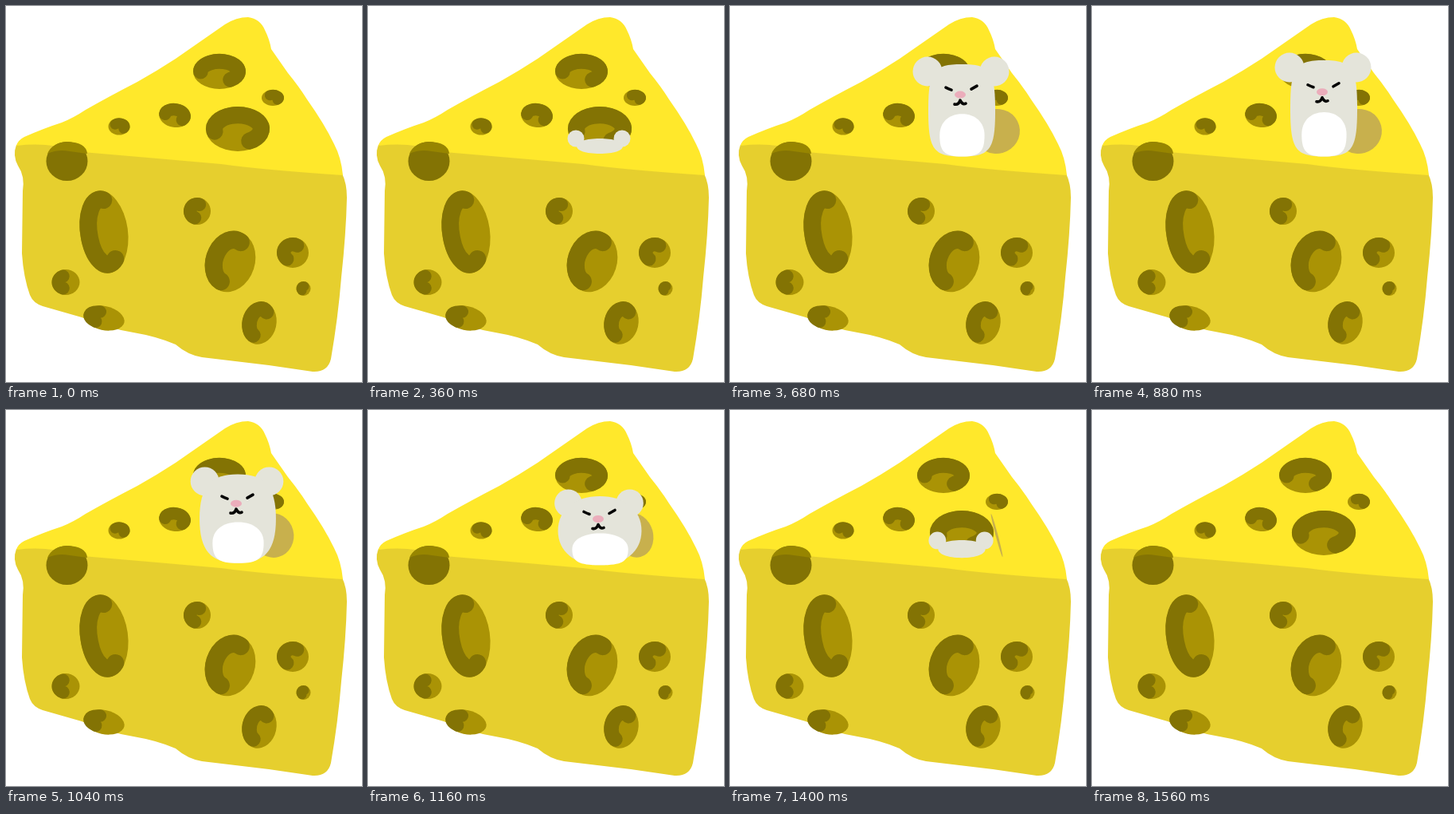
An HTML page for the animation above (2.04 s loop, 447 by 471 pixels).

```html
<!DOCTYPE html>
<html lang="en">
<head>
<meta charset="utf-8">
<title>Mouse in cheese</title>
<style>
  html, body { margin: 0; width: 100%; height: 100%; overflow: hidden; background: #fff; }
  svg { display: block; }
  .light { fill: #aa9305; }
  .dark { fill: none; stroke: #837304; stroke-linecap: round; }
  .line { fill: none; stroke: #050505; stroke-width: 3.6; stroke-linecap: round; stroke-linejoin: round; }
</style>
</head>
<body>
<svg width="447" height="471" viewBox="0 0 447 471">
  <path fill="#e6cf2e" d="M13 174Q8 187 15 200Q24 213 21 232L20 310Q22 340 30 362Q34 372 46 376L95 390Q125 403 160 409Q190 414 213 424Q228 437 246 440L330 450L385 458Q404 459 408 442Q417 390 421 340Q427 285 428 240Q428 222 422 210L300 190L40 165Z"/>
  <path fill="#ffe82b" d="M13 175Q15 168 23 164Q48 153 70 146Q85 140 100 130Q130 113 165 95Q190 81 213 66L275 23Q289 14 304 14Q319 16 325 30Q331 42 333 54L354 84Q368 101 378 117Q400 148 412 173Q421 190 423 212Q320 205 270 198L190 191L85 182Q55 170 13 175Z"/>
  <g id="holes"></g>
  <ellipse cx="76.500" cy="194.500" rx="26" ry="24.500" fill="#837304"/>
  <path fill="#978500" d="M52 185Q58 171 77 170Q101 171 102 185L80 182Q65 179 52 185Z"/>
  <g id="mouse">
    <ellipse id="shadow" fill="#c8b04d"/>
    <g fill="#e4e4da">
      <circle id="earL"/><circle id="earR"/><path id="body"/>
    </g>
    <g id="front">
      <path id="belly" fill="#fff"/>
      <g id="face">
        <path class="line" d="M-18-9q4 2 7 3M14-7l7-4M-7 12q5 1 7-5q3 6 7 4"/>
        <ellipse rx="7" ry="4.500" fill="#ebadbb"/>
      </g>
    </g>
  </g>
</svg>
<script>
const $ = id => document.getElementById(id);
const set = (id, attrs) => Object.entries(attrs).forEach(([k, v]) => $(id).setAttribute(k, v));
const clamp = v => Math.max(0, Math.min(1, v));

// A light oval with a dark brush stroke running inside its rim between two angles
function hole(cx, cy, rx, ry, from, to, tilt = 0) {
  const width = 4 * Math.sqrt(Math.min(rx, ry));
  const ax = rx - width / 2, ay = ry - width / 2;
  const point = deg => `${ax * Math.cos(deg * Math.PI / 180)} ${ay * Math.sin(deg * Math.PI / 180)}`;
  $('holes').insertAdjacentHTML('beforeend',
    `<g transform="translate(${cx} ${cy}) rotate(${tilt})">
       <ellipse class="light" rx="${rx}" ry="${ry}"/>
       <path class="dark" stroke-width="${width}" d="M${point(from)}A${ax} ${ay} 0 ${+(to - from > 180)} 1 ${point(to)}"/>
     </g>`);
}

hole(268, 82, 33, 22, 180, 415);
hole(335, 115, 14, 10, 240, 400);
hole(212, 137, 20, 15, 180, 395, 8);
hole(142, 151, 13.5, 10.5, 225, 395);
hole(291, 154, 40, 28, 170, 420);
hole(123, 283, 30, 52, 60, 285, -8);
hole(240, 257, 17, 17, 110, 290);
hole(281.5, 320, 31, 39, 100, 285, 18);
hole(360, 309, 20, 19, 130, 300);
hole(373.5, 354, 9, 9, 130, 290);
hole(75, 346, 17.5, 16, 110, 250);
hole(123, 391, 26, 15, 120, 250, 12);
hole(318, 397, 21.5, 27, 110, 300, 12);

// Height of the head over time: pop up, settle, stretch, sink
const headKeys = [[360, 166], [480, 95], [560, 64], [680, 73], [880, 68], [960, 62], [1160, 108], [1400, 163], [1560, 181]];

function headTop(t) {
  const i = headKeys.findIndex(key => key[0] > t);
  const [t0, y0] = headKeys[i - 1], [t1, y1] = headKeys[i];
  return y0 + (y1 - y0) * (t - t0) / (t1 - t0);
}

// Closed oval; c = .55 is round, larger is boxier
function oval(l, t, r, b, c, low = c) {
  const x = (l + r) / 2, y = (t + b) / 2, w = (r - l) / 2, h = (b - t) / 2;
  return `M${l} ${y}C${l} ${y - c * h} ${x - c * w} ${t} ${x} ${t}` +
    `S${r} ${y - c * h} ${r} ${y}C${r} ${y + low * h} ${x + low * w} ${b} ${x} ${b}` +
    `S${l} ${y + low * h} ${l} ${y}`;
}

function drawMouse(t) {
  const top = headTop(t);
  const rise = Math.min(1, (166 - top) / 60);
  const squash = Math.sin(Math.PI * clamp((t - 960) / 440));
  const bottom = 185 + 3.5 * rise + 6 * squash, height = bottom - top;
  const half = 29 + 13 * rise + 11 * squash, left = 291 - half, right = 291 + half;
  const earGap = 29 + 13 * rise - 3 * squash, earY = top + 9 * rise, r = 10.5 + 8 * rise - squash;
  const reach = Math.max(0, 29 * rise - 5 * squash);

  set('shadow', { cx: 335, cy: 157, rx: reach, ry: reach && 28, transform: 'rotate(-15 335 157)' });
  set('earL', { cx: 290 - earGap, cy: earY, r });
  set('earR', { cx: 290 + earGap, cy: earY, r });
  set('body', { d: oval(left, top, right, bottom, .6 + .25 * clamp(rise) * (1 - squash)) });
  set('front', { display: height > 50 ? 'inline' : 'none' });
  set('belly', { d: oval(left + .34 * half, bottom - .46 * height, right - .32 * half, bottom, .6, .78) });
  set('face', { transform: `translate(289 ${top + .33 * height})` });
}

function draw(now) {
  const t = Math.floor(now % 2040 / 40) * 40;
  const visible = t >= 360 && t < 1560;
  set('mouse', { display: visible ? 'inline' : 'none' });
  if (visible) drawMouse(t);
  requestAnimationFrame(() => draw(performance.now() - start));
}

const start = performance.now();
draw(0);
</script>
</body>
</html>
```
